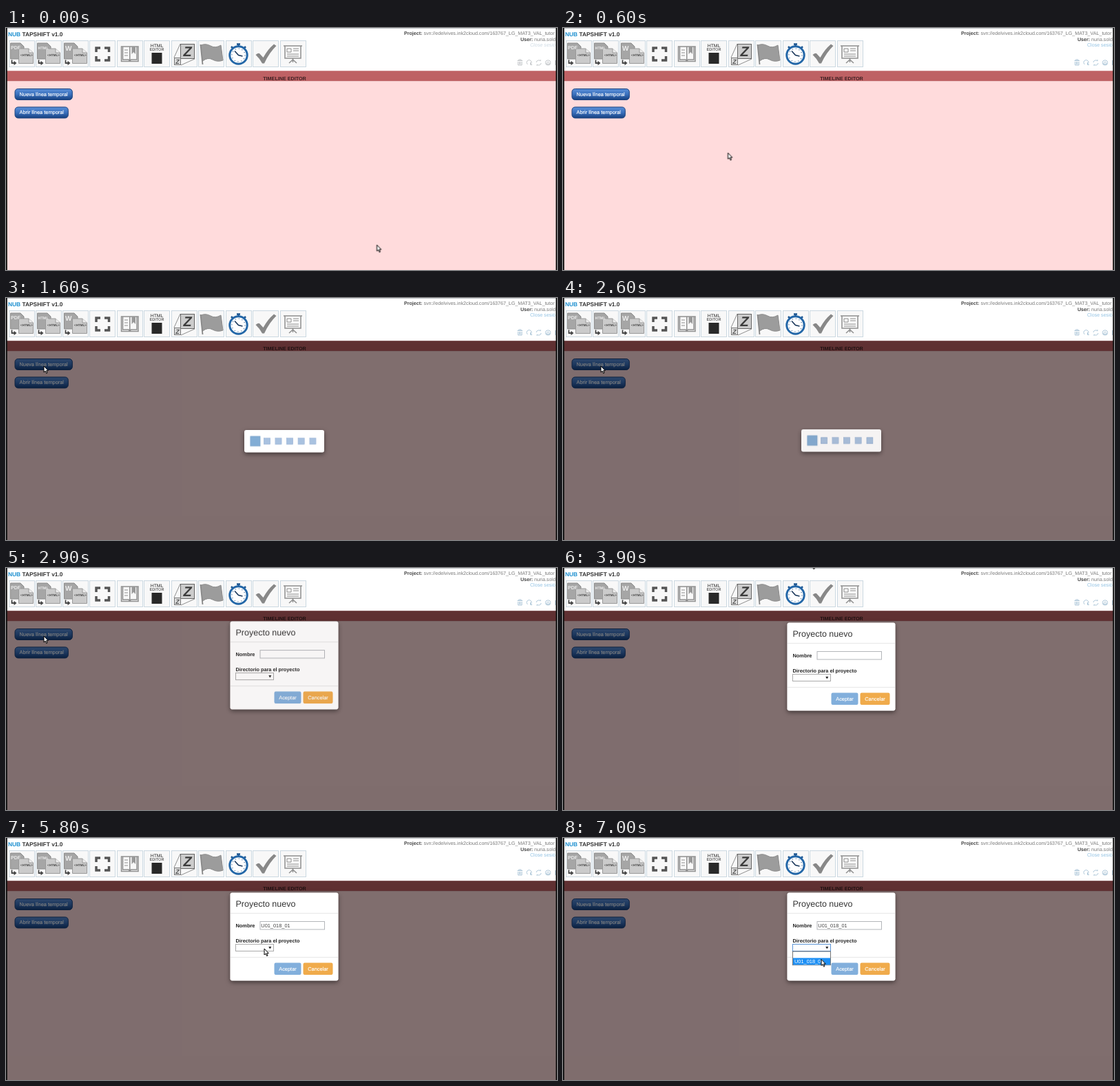
Animation, 800 px wide and 352 px high, one loop 7200 ms. Source, as an HTML page:

```html
<!DOCTYPE html>
<html lang="es">
<head>
<meta charset="utf-8">
<title>Timeline editor</title>
<style>
html, body { margin: 0; width: 100%; height: 100%; overflow: hidden; background: #fff; }
svg { display: block; }
text { font: 7.4px "Liberation Sans", Arial, sans-serif; text-rendering: geometricPrecision; white-space: pre; }
.b { font-weight: bold; }
.info text { font-size: 7.1px; fill: #777; }
.info .b { fill: #444; }
#tile { fill: #f8f8f8; stroke: #cbd8e1; }
.line { fill: none; stroke: #8f8f8f; }
.tools { fill: none; stroke: #adc6d8; }
.btn rect { fill: url(#blue); stroke: #1a427f; }
.btn text { fill: #fff; stroke: #fff; stroke-width: .15px; }

.pale, .live, .hover, .dim, .loader, .modal, .cover, .list, .pick, .item, .cursor {
  animation: 7.2s step-end infinite;
}
.pale { animation-name: pale; }
.live { animation-name: live; }
.hover { animation-name: hover; }
.dim { animation-name: dim; }
.loader { animation-name: loader; }
.modal { animation-name: modal; }
.cover { animation-name: type; }
.list { animation-name: list; }
.pick { animation-name: pick; }
.item { animation-name: item; }
.cursor { animation-name: move; animation-timing-function: ease-in-out; }
.dot {
  fill: #a9c2e0; stroke: #8eabd0; stroke-width: .6;
  animation: pulse .9s step-end infinite;
  animation-delay: calc(-220ms + var(--i) * 150ms);
}

@keyframes pale { 0% { opacity: 1; } 1.2%, 100% { opacity: 0; } }
@keyframes live { 0% { opacity: 0; } 1.2%, 100% { opacity: 1; } }
@keyframes hover { 0% { opacity: 0; } 13.5% { opacity: 1; } 21.94%, 100% { opacity: 0; } }
@keyframes dim { 0% { opacity: 0; } 21.94%, 100% { opacity: .5; } }
@keyframes loader {
  0% { opacity: 0; transform: none; }
  21.94% { opacity: 1; transform: none; }
  35.3% { opacity: 1; transform: none; animation-timing-function: ease-in; }
  38.9%, 100% { opacity: 0; transform: translateY(-12px); }
}
@keyframes pulse {
  0% { transform: scale(1.55); fill: #82add5; stroke: #79a3cb; }
  16.67%, 100% { transform: none; fill: #a9c2e0; stroke: #8eabd0; }
}
@keyframes modal {
  0% { opacity: 0; transform: translateY(-30px); }
  37.5% { opacity: 0; transform: translateY(-30px); animation-timing-function: ease-out; }
  41%, 100% { opacity: 1; transform: none; }
}
@keyframes type {
  0% { transform: none; }
  63.8% { transform: translateX(5.4px); animation-timing-function: steps(9); }
  75%, 100% { transform: translateX(42.8px); }
}
@keyframes list { 0% { opacity: 0; } 94.2%, 100% { opacity: 1; } }
@keyframes pick { 0% { opacity: 0; } 95.6%, 100% { opacity: 1; } }
@keyframes item { 0% { fill: #222; } 95.6%, 100% { fill: #fff; } }
@keyframes move {
  0%, 1% { transform: translate(538.5px, 315.5px); opacity: 1; }
  13.9%, 40.3% { transform: translate(55px, 99px); }
  45.8%, 51.4% { transform: translate(330px, 60px); }
  54.1% { transform: translate(360.3px, -9px); }
  55.5% { transform: translate(361px, -13px); }
  58.3% { transform: translate(415px, 126px); }
  63.7% { transform: translate(415px, 126px); opacity: 1; }
  63.8% { transform: translate(415px, 126px); opacity: 0; }
  75.7% { transform: translate(415px, 126px); opacity: 0; }
  75.8% { transform: translate(415px, 126px); opacity: 1; }
  79.8%, 94.2% { transform: translate(375px, 161px); }
  96.8%, 100% { transform: translate(375px, 176.5px); opacity: 1; }
}
</style>
</head>
<body>
<svg width="800" height="352" viewBox="0 0 800 352">
  <defs>
    <linearGradient id="blue" x2="0" y2="1">
      <stop stop-color="#5a8fd8"/><stop offset=".5" stop-color="#3a70bd"/><stop offset="1" stop-color="#16407f"/>
    </linearGradient>
    <linearGradient id="glow" x2="0" y2="1">
      <stop stop-color="#163f80"/><stop offset=".5" stop-color="#3a70c0"/><stop offset="1" stop-color="#6a9fec"/>
    </linearGradient>
    <filter id="shadow" x="-20%" y="-30%" width="140%" height="170%">
      <feDropShadow dx="0" dy="2.5" stdDeviation="3" flood-opacity=".5"/>
    </filter>
    <rect id="tile" x=".5" y="-.5" width="37" height="38"/>
    <g id="doc">
      <path d="M2.5 3H17L22 8V26H2.5Z" fill="#a6a6a6" stroke="#8a8a8a"/>
      <path d="M14.5 11H29L35.5 17V32.5H14.5Z" fill="#cbcbcb" stroke="#9a9a9a"/>
      <path d="M29 11V17H35.5" fill="#eee" stroke="#9a9a9a"/>
      <path d="M4.5 27.500V32H8" fill="none" stroke="#444" stroke-width="1.800"/>
      <path d="M7.500 28.800L11.500 32L7.500 35.200Z" fill="#444"/>
      <text x="17" y="22" class="b" style="font-size:4.500px" fill="#444">&lt;HTML&gt;</text>
    </g>
    <g id="tools">
      <path d="M742.5 47.5H750M744.5 47V46H748V47M743.5 49V54H749V49M745.5 49V53M747 49V53"/>
      <path d="M757.5 53A3.5 3.5 0 1 1 761.5 53M761.5 50V53.5H764"/>
      <path d="M770 50A3.5 3.5 0 0 1 776 48V46M777 51A3.5 3.5 0 0 1 771 53V55"/>
      <circle cx="787" cy="50.5" r="3.7"/>
      <path d="M785 51L787 49L789 51V52.5H785Z"/>
      <path d="M797.5 47V54"/>
    </g>
  </defs>

  <rect width="800" height="352" fill="#fff"/>
  <rect width="800" height="1" fill="#c4c8cb"/>
  <text x="3" y="11.500" class="b" style="font-size:8.400px" fill="#333"><tspan fill="#1c8fd0">NUB</tspan> TAPSHIFT v1.0</text>

  <g class="info">
    <text x="578" y="10"><tspan class="b">Project:</tspan> svn://edelvives.ink2cloud.com/163767_LG_MAT3_VAL_tutor</text>
    <text x="747" y="18.500"><tspan class="b">User:</tspan> nuria.sold</text>
    <g class="pale">
      <text x="761" y="27" style="fill:#cbd8e2;font-style:italic">Close sesió</text>
      <use href="#tools" class="tools" style="stroke:#c2c5c8"/>
    </g>
    <g class="live">
      <text x="761" y="27" style="fill:#8fc0e2">Close sesió</text>
      <use href="#tools" class="tools"/>
    </g>
  </g>

  <g transform="translate(4 19)">
    <use href="#tile"/>
    <use href="#doc"/>
    <text x="3" y="12" class="b" style="font-size:7px" fill="#eee">PDF</text>
  </g>
  <g transform="translate(43 19)">
    <use href="#tile"/>
    <use href="#doc"/>
    <text x="3.5" y="11.500" class="b" style="font-size:5.500px" fill="#eee">HTML</text>
  </g>
  <g transform="translate(82 19)">
    <use href="#tile"/>
    <use href="#doc"/>
    <text x="4" y="13.500" class="b" style="font-size:10px" fill="#eee">W</text>
  </g>
  <g transform="translate(121 19)">
    <use href="#tile"/>
    <path d="M10 16V10H16M22 10H28.500V16M28.500 22V28H22M16 28H10V22" fill="none" stroke="#555" stroke-width="3.500"/>
  </g>
  <g transform="translate(161 19)">
    <use href="#tile"/>
    <path class="line" stroke-width="1.500" d="M6.500 8H31V29.500H6.500ZM8.500 8V27H17L18.750 29L20.500 27H29V8M18.750 8V29"/>
    <path d="M21.500 8H27V19L24.250 16L21.500 19Z" fill="#999"/>
    <path class="line" d="M11 13H16M11 17H16M11 21H16"/>
  </g>
  <g transform="translate(200 19)">
    <use href="#tile"/>
    <g text-anchor="middle" class="b" fill="#222">
      <text x="19" y="8.800" style="font-size:6.800px">HTML</text>
      <text x="19" y="14.400" style="font-size:5.600px">EDITOR</text>
    </g>
    <rect x="11.500" y="17" width="15" height="16" fill="#292929"/>
  </g>
  <g transform="translate(240 19)">
    <use href="#tile"/>
    <path class="line" d="M13 4L4 24M34 26L14 35"/>
    <rect x="13.500" y="4.500" width="20" height="21" fill="#ccc" stroke="#666"/>
    <rect x="4.500" y="24.500" width="9" height="10" fill="#ddd" stroke="#777"/>
    <text x="23.500" y="22" text-anchor="middle" class="b" style="font-size:20px;font-style:italic" fill="#3c3c3c">Z</text>
    <text x="9" y="32.800" text-anchor="middle" class="b" style="font-size:9px;font-style:italic" fill="#555">Z</text>
  </g>
  <g transform="translate(279 19)">
    <use href="#tile" style="fill:#e6e6e6"/>
    <path d="M3.500 5L6.500 34" stroke="#858585" stroke-width="1.800"/>
    <path d="M4 6Q11 3 18 7T33 6L36 28Q28 31 21 27T6.500 29Z" fill="#9c9c9c" stroke="#8c8c8c"/>
  </g>
  <g transform="translate(319 19)">
    <use href="#tile" style="stroke:#a9cbe6"/>
    <path d="M16 4.500H21M18.500 4.500V8M8 8L10 10M29 8L27 10" stroke="#1d5590" stroke-width="2.500"/>
    <circle cx="18.500" cy="20.500" r="12.700" fill="#fff" stroke="#2367a8" stroke-width="3"/>
    <circle cx="18.500" cy="20.500" r="9.500" fill="none" stroke="#1d5590" stroke-width="1.200" stroke-dasharray="1 3.974"/>
    <path d="M13 14.500L18.500 20.500L24.500 22" fill="none" stroke="#17365a" stroke-width="1.600"/>
  </g>
  <g transform="translate(358 19)">
    <use href="#tile" style="fill:#ececec"/>
    <path d="M4.500 20Q8 17 10 18L15.500 24Q22 12 31 4.500L34.500 7Q24 17 17 32.500H14Q10 25 4.500 20Z" fill="#888"/>
  </g>
  <g transform="translate(398 19)">
    <use href="#tile"/>
    <path class="line" stroke-width="1.500" d="M5 7H32M7 7V25H30V7M18.500 25V31M13 32L18.500 27L24 32"/>
    <path class="line" d="M10 11H16V16H10ZM19 11H27M19 14H27M10 19H27M10 22H27"/>
  </g>

  <rect y="62.300" width="800" height="15.200" fill="#be6164"/>
  <rect y="77.500" width="800" height="275" fill="#ffdbdc"/>
  <text x="404.500" y="76.200" text-anchor="middle" class="b" style="font-size:7.200px" fill="#3c2022">TIMELINE EDITOR</text>

  <g class="btn">
    <rect x="13" y="88.500" width="83.300" height="16" rx="4.500"/>
    <rect class="hover" x="13" y="88.500" width="83.300" height="16" rx="4.500" style="fill:url(#glow)"/>
    <text x="19.500" y="98.600">Nueva línea temporal</text>
    <rect x="13" y="115" width="77.300" height="16" rx="4.500"/>
    <text x="19.500" y="125.200">Abrir línea temporal</text>
  </g>

  <rect class="dim" y="62.300" width="800" height="290"/>
  <path d="M0 0H1.800V352H0ZM798.300 0H800V352H798.300Z" fill="#111"/>

  <g class="loader">
    <rect x="346" y="192" width="116" height="32.500" rx="3" fill="#fff" filter="url(#shadow)"/>
    <g transform="translate(362 208.300)"><rect class="dot" style="--i:0" x="-4.500" y="-4.500" width="9" height="9"/></g>
    <g transform="translate(379 208.300)"><rect class="dot" style="--i:1" x="-4.500" y="-4.500" width="9" height="9"/></g>
    <g transform="translate(395.500 208.300)"><rect class="dot" style="--i:2" x="-4.500" y="-4.500" width="9" height="9"/></g>
    <g transform="translate(412 208.300)"><rect class="dot" style="--i:3" x="-4.500" y="-4.500" width="9" height="9"/></g>
    <g transform="translate(428.700 208.300)"><rect class="dot" style="--i:4" x="-4.500" y="-4.500" width="9" height="9"/></g>
    <g transform="translate(445.500 208.300)"><rect class="dot" style="--i:5" x="-4.500" y="-4.500" width="9" height="9"/></g>
  </g>

  <g class="modal">
    <rect x="325.500" y="79.500" width="157" height="128" rx="3" fill="#fff" filter="url(#shadow)"/>
    <path d="M326 109.500H482M326 173.500H482" stroke="#e7e7e7"/>
    <text x="333.500" y="100.300" style="font-size:12.500px" fill="#333">Proyecto nuevo</text>
    <g fill="#222">
      <text x="333.500" y="129.800" class="b">Nombre</text>
      <text x="333.500" y="151.500" class="b" style="font-size:7.300px">Directorio para el proyecto</text>
    </g>
    <rect x="369" y="121.500" width="93.500" height="11.500" fill="#fff" stroke="#b3b6ba"/>
    <text x="370.300" y="129.900" fill="#444">U01_018_01</text>
    <rect class="cover" x="370" y="122.500" width="46" height="9.500" fill="#fff"/>
    <rect x="333.500" y="154.500" width="55" height="10" fill="#fff" stroke="#aaa"/>
    <path d="M381.300 158H385.300L383.300 161.500Z" fill="#222"/>
    <rect x="389.500" y="181.500" width="39" height="17.500" rx="2.200" fill="#82afdc"/>
    <rect x="431.500" y="181.500" width="43" height="17.500" rx="2.200" fill="#f0ab4b"/>
    <g fill="#fff" stroke="#fff" stroke-width=".15" text-anchor="middle">
      <text x="409" y="192.800">Aceptar</text>
      <text x="453" y="192.800">Cancelar</text>
    </g>
    <g class="list">
      <rect x="333.500" y="154.500" width="55" height="10" fill="none" stroke="#5a94d6"/>
      <rect x="333.500" y="165" width="55" height="19.800" fill="#fff" stroke="#555" stroke-width=".8"/>
      <rect class="pick" x="334" y="174.500" width="54" height="10" fill="#1e90f5"/>
      <text class="item" x="336" y="182.200">U01_018_01</text>
    </g>
  </g>

  <g class="cursor">
    <path d="M0 0V9L2.100 7.200L3.600 10.600L5 10L3.600 6.700H6.300Z" fill="#fff" stroke="#000"/>
  </g>
</svg>
</body>
</html>
```
